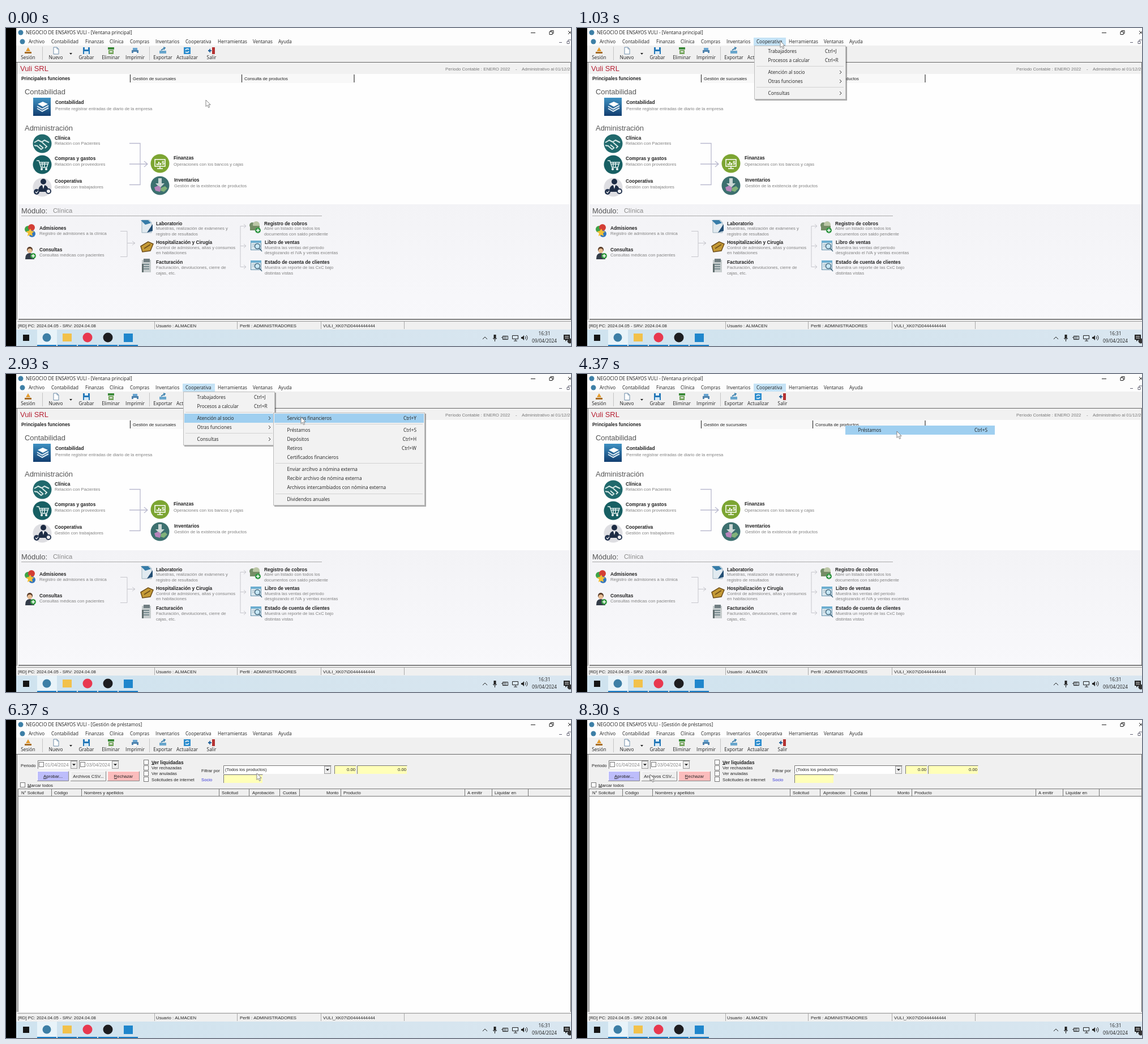
Animation, 998 px wide and 561 px high, one loop 8.33 s. Source, as an HTML page with a canvas:

```html
<!DOCTYPE html>
<html lang="es">
<head>
<meta charset="utf-8">
<title>Ventana principal</title>
<style>
html, body { margin: 0; width: 100%; height: 100%; overflow: hidden; background: #000 }
canvas { display: block; width: 998px; height: 561px }
</style>
</head>
<body>
<canvas id="stage" width="998" height="561"></canvas>
<script>
const g = document.getElementById('stage').getContext('2d');
const LOOP = 8330;
const UI = '"Open Sans", "Noto Sans", sans-serif';
const SANS = '"Liberation Sans", Arial, sans-serif';

// y is the visual middle of the line
function text(s, x, y, { size = 7.7, color = '#222', bold = false, align = 'left', font = SANS } = {}) {
  g.font = `${bold ? 'bold ' : ''}${size}px ${font}`;
  g.fillStyle = color;
  g.textAlign = align;
  g.fillText(s, x, y + size * .36);
}
const ui = (s, x, y, o) => text(s, x, y, { size: 8.3, font: UI, ...o });
const label = (s, x, y, o) => text(s, x, y, { size: 8.35, bold: true, ...o });
const note = (s, x, y) => text(s, x, y, { color: '#808080' });
const big = (s, x, y, o) => text(s, x, y, { size: 12.95, color: '#555', ...o });

function box(color, x, y, w, h) { g.fillStyle = color; g.fillRect(x, y, w, h); }
function frame(color, x, y, w, h) { g.strokeStyle = color; g.lineWidth = 1; g.strokeRect(x + .5, y + .5, w - 1, h - 1); }
function disc(color, x, y, r) { g.fillStyle = color; g.beginPath(); g.arc(x, y, r, 0, 7); g.fill(); }
function fill(color, d) { g.fillStyle = color; g.fill(new Path2D(d)); }
function line(color, d, w = 1) { g.strokeStyle = color; g.lineWidth = w; g.stroke(new Path2D(d)); }
function fade(c1, c2, y, h) {
  const f = g.createLinearGradient(0, y, 0, y + h);
  f.addColorStop(0, c1); f.addColorStop(1, c2);
  return f;
}
function at(x, y, draw) { g.save(); g.translate(x, y); draw(); g.restore(); }

function windowFrame(title) {
  box('#fdfdfd', 18, 0, 980, 31);
  disc('#3d7fa6', 26, 8, 4.5);
  ui(`NEGOCIO DE ENSAYOS VULI - [${title}]`, 35, 8.5);
  line('#222', 'M927 8.5h8M960 6.5h5v5h-5zM962 6v-1.5h5v5h-1.5M993 5l6 6M993 11l6-6');
  line('#667', 'M977 25.5h5M991 23.5h4v4h-4zM993 23v-2h5');
  disc('#3d7fa6', 29, 24, 4.5);
}

const MENUS = [['Archivo', 40], ['Contabilidad', 80], ['Finanzas', 140], ['Clínica', 183], ['Compras', 219],
  ['Inventarios', 264], ['Cooperativa', 317], ['Herramientas', 374], ['Ventanas', 436], ['Ayuda', 481]];

function menuBar(open) {
  if (open) box('#c5e3f6', 312, 17, 57, 14);
  for (const [s, x] of MENUS) ui(s, x, 24, { size: 8.1 });
}

function toolbar() {
  box('#f0f0f0', 18, 31, 980, 30);
  line('#c4c4c4', 'M64.5 33v24M253.5 33v24');
  const tools = [['Sesión', 39], ['Nuevo', 88], ['Grabar', 142], ['Eliminar', 185], ['Imprimir', 228],
    ['Exportar', 277], ['Actualizar', 320], ['Salir', 363]];
  for (const [s, x] of tools) ui(s, x, 52, { align: 'center' });
  fill('#e59b2c', 'M39 34l4 7h-8z'); box('#a66b24', 33, 42, 12, 3);
  fill('#fff', 'M84 34h6l3 3v9h-9z'); line('#6c8ca8', 'M84 34h6l3 3v9h-9zM90 34v3h3');
  fill('#222', 'M112 44h5l-2.5 3z');
  box('#2478b8', 136, 34, 12, 12); box('#e6f2fa', 139, 34, 6, 4); box('#d4e8f5', 138, 41, 8, 5);
  box('#3c8a3a', 180, 34, 11, 4); box('#75a55c', 181, 39, 9, 7); line('#eee', 'M183 42h5', 2);
  box('#6aa5d0', 224, 35, 8, 4); box('#5083ad', 222, 39, 12, 5); box('#fff', 225, 42, 6, 4);
  box('#69a6cc', 271, 40, 12, 5); line('#2f78a8', 'M274 39l5-3M278 34l3 1-2 3', 1.5);
  box('#2c8dce', 314, 34, 12, 12); line('#fff', 'M317 39a3.5 3 0 0 1 6-1M323 41a3.5 3 0 0 1-6 1', 1.5);
  box('#b43232', 364, 34, 5, 12); line('#27649b', 'M357 40h6', 2); fill('#27649b', 'M357 40l4-4v8z');
}

function statusBar() {
  box('#f0f0f0', 18, 516, 980, 16);
  line('#999', 'M20 517.5H998');
  line('#aaa', 'M262.5 518v13M408.5 518v13M556.5 518v13M703.5 518v13');
  const o = { size: 7.8 };
  text('[RD] PC: 2024.04.05 - SRV: 2024.04.08', 21, 525, o);
  text('Usuario : ALMACEN', 265, 525, o);
  text('Perfil : ADMINISTRADORES', 413, 525, o);
  text('VULI_XK07\\D0444444444', 560, 525, o);
}

function taskbar() {
  const f = g.createLinearGradient(18, 0, 998, 0);
  f.addColorStop(0, '#cfe3ef'); f.addColorStop(.5, '#d4e4ee'); f.addColorStop(1, '#d9e6f0');
  box(f, 18, 532, 980, 29);
  box('#e8f3f9', 55, 532, 35, 29);
  for (let i = 0; i < 5; i++) box('#1479c4', 55 + i * 36, 559, 34, 2);
  box('#151515', 30, 541, 11, 11);
  disc('#3d7fa6', 72, 546, 7.5);
  box('#f2c14b', 100, 539, 16, 14);
  disc('#e8384f', 144, 546, 8.5);
  disc('#1d1d20', 180, 546, 8.5);
  box('#1f86cc', 208, 539, 16, 15);
  const ink = '#222';
  line(ink, 'M842 549l4-4 4 4');
  box(ink, 861.5, 541, 4, 7); line(ink, 'M860 547q3.5 5 7 0M863.5 550v3');
  line(ink, 'M877.5 543.5h9v6h-9zM875 546h2M880 544v5M883 544v5');
  line(ink, 'M894.5 542.5h10v6h-10zM897 552h6M900 549v3');
  fill(ink, 'M910 545h2l3-3v9l-3-3h-2z'); line(ink, 'M917 544q2 2.5 0 5M919 542q4 4.5 0 9');
  ui('16:31', 951, 539.5, { align: 'center' });
  ui('09/04/2024', 951, 552.5, { align: 'center' });
  fill(ink, 'M985 541h11v9h-5l-3 3v-3h-3z'); line('#fff', 'M987 544h7M987 547h7');
  disc('#333', 996, 552, 4.5);
}

function roundIcon(color, x, y, draw) {
  at(x, y, () => { disc(color, 0, 0, 16.5); draw(); });
}

function paperIcon(x, y) {
  at(x, y, () => {
    box('#d6e5ed', -9, -9, 19, 17); frame('#6a95af', -9, -9, 19, 17);
    box('#6daed0', -9, -9, 19, 4);
    line('#a3b6c0', 'M-6-2h7M-6 1h5');
    disc('#c7e7f5', 3, 1, 4.5); line('#466b80', 'M7.5 1a4.5 4.5 0 1 1-9 0a4.5 4.5 0 1 1 9 0M6 4l5 6', 1.5);
  });
}

function mainIcons() {
  box(fade('#3e91c2', '#123e70', 123, 32), 48, 123, 31, 32);
  fill('#fff', 'M56 134l9-4 9 4-9 5z'); line('#dceaf4', 'M55 138l9 5 11-6M55 142l9 5 11-6', 2);
  roundIcon('#20696c', 64, 204, () => {
    line('#d8e9e7', 'M-14-2l7-4 6 3 5-3 8 4M-10 3l8 7 3-2M-5 2l7 6M0-2l8 7-3 3M-14 3l4 1', 2);
  });
  roundIcon('#175f63', 64, 241, () => {
    line('#e3f1ef', 'M-10-7h4l4 12h10l3-9H-5M-3-1h13M0-4v8M4-4v8', 1.5);
    disc('#fff', -1, 8, 2); disc('#fff', 7, 8, 2);
  });
  roundIcon('#dedee2', 64, 281, () => {
    disc('#1d2c44', 2, -10, 5); fill('#1d2c44', 'M-7 8q0-12 9-12t9 12z');
    fill('#fff', 'M0-4h4l-2 7z');
    disc('#24344f', -10, 8, 5); line('#fff', 'M-12 8l2 2 3-4', 1.2);
    disc('#24344f', 11, 7, 5); disc('#f4f4f4', 11, 7, 3);
  });
  roundIcon('#7ca532', 272, 239, () => {
    line('#fff', 'M-9-7h18v12H-9zM0 5v4M-5 9h10', 1.5);
    line('#fff', 'M-5 3v-3M-2 3v-6M1 3v-4', 2);
    text('$', 3, -1, { color: '#fff', bold: true, size: 9 });
  });
  roundIcon('#3d706f', 272, 278, () => {
    fill('#cbd7d5', 'M-3-13h6v9h5l-8 8-8-8h5z');
    fill('#b784bb', 'M-10 3l7-3 5 4-2 7-8-2z'); fill('#82b27a', 'M2 4l7-3 4 4-6 6-6-2z');
  });

  disc('#3da447', 39, 355, 6); disc('#d33e35', 45, 352, 6); disc('#3476bd', 46, 363, 6);
  fill('#f2bf35', 'M43 354l2 4 5 1-4 3 1 5-4-2-5 2 1-5-4-3 5-1z');
  disc('#593c28', 42, 391, 5); disc('#e8bd94', 42, 393, 4);
  fill('#333c48', 'M34 408q0-11 8-11t8 11z'); disc('#389c45', 48, 402, 5); line('#fff', 'M45 402h6M48 399v6', 1.5);
  fill('#e1eaf0', 'M240 339h13l4 4v18h-17z'); line('#9eb2bd', 'M240 339h13l4 4v18h-17z');
  fill('#367ca8', 'M238 339h13l5 5-10 3z'); fill('#244f75', 'M249 361l10-3v-12z');
  fill('#c49a36', 'M238 385l13-8 9 4-5 12-14 2z'); line('#6e4d1b', 'M238 385l13-8 9 4-5 12-14 2zM244 389l11-7', 1.5);
  box('#c6cccd', 240, 409, 16, 22); box('#707d81', 243, 407, 11, 6); line('#788b90', 'M243 417h10M243 421h10M243 425h10', 2);
  box('#626f70', 240, 416, 3, 15);
  disc('#748e69', 435, 348, 5); disc('#bbc6a6', 442, 347, 6); box('#758d66', 431, 349, 17, 8);
  disc('#329744', 445, 357, 5); line('#fff', 'M442 357h6M445 354v6', 1.5);
  paperIcon(441, 384); paperIcon(441, 419);
}

const ITEMS = [
  ['Contabilidad', 87, 130.5, 'Permite registrar entradas de diario de la empresa', 142.5],
  ['Clínica', 86, 193.5, 'Relación con Pacientes', 203.5],
  ['Compras y gastos', 86, 230, 'Relación con proveedores', 240],
  ['Cooperativa', 86, 269.5, 'Gestión con trabajadores', 280],
  ['Finanzas', 296, 228.5, 'Operaciones con los bancos y cajas', 240],
  ['Inventarios', 297, 268, 'Gestión de la existencia de productos', 278.5],
  ['Admisiones', 59, 353, 'Registro de admisiones a la clínica', 362.5],
  ['Consultas', 59, 391, 'Consultas médicas con pacientes', 400.5],
  ['Laboratorio', 265, 344.5, 'Muestras, realización de exámenes y|registro de resultados', 353.5],
  ['Hospitalización y Cirugía', 265, 378, 'Control de admisiones, altas y consumos|en habitaciones', 387],
  ['Facturación', 265, 413, 'Facturación, devoluciones, cierre de|cajas, etc.', 422.5],
  ['Registro de cobros', 456, 344.5, 'Abre un listado con todos los|documentos con saldo pendiente', 353.5],
  ['Libro de ventas', 457, 378, 'Muestra las ventas del periodo|desglozando el IVA y ventas excentas', 387],
  ['Estado de cuenta de clientes', 457, 413, 'Muestra un reporte de las CxC bajo|distintas vistas', 422.5]
];

// panel below the toolbar with its dark edges
function panel(color) {
  box(color, 18, 61, 980, 455);
  line('#666', 'M18 60.5H998M19.5 61V515M997.5 61V515');
}

function mainView() {
  panel('#fefefe');
  box('#f1f1f1', 20, 61, 977, 20);
  box(fade('#f3f3f6', '#f8f8fb', 311, 203), 22, 311, 975, 203);
  line('#555', 'M22 514H998', 1.3);
  big('Vuli SRL', 25, 71, { color: '#b51f32' });
  const o = { size: 7.8, color: '#777' };
  text('Período Contable : ENERO 2022', 776, 72, o);
  text('-', 900, 72, o);
  text('Administrativo al 01/12/2022', 911, 72, o);
  box('#f8f8f8', 220, 81, 396, 16);
  label('Principales funciones', 27, 89);
  text('Gestión de sucursales', 224, 89.5);
  text('Consulta de productos', 421, 89.5);
  line('#444', 'M219.5 82v14M416.5 82v14M615 82v14', 1.3);
  big('Contabilidad', 33, 112.5);
  big('Administración', 33, 176.5);
  big('Módulo:', 27, 322);
  text('Clínica', 83, 322, { size: 11.2, color: '#888' });
  line('#aaa', 'M27 331.5H558');
  line('#b9b9ce', 'M218 203.5h19v73h-19M218 240h31M244 235l6 5-6 5', 1.3);
  line('#c6c6cc', 'M202 358.5h12v45h-12M214 379.5h13M223 376l5 3.5-5 3.5M424 349.5h-10v72h10M414 384.5h10M420 346l4 3.5-4 3.5M420 381l4 3.5-4 3.5M420 418l4 3.5-4 3.5');
  mainIcons();
  for (const [name, x, y, desc, dy] of ITEMS) {
    label(name, x, y);
    desc.split('|').forEach((s, i) => note(s, x, dy + i * 9.5));
  }
}

function field(color, x, y, w, h) {
  box(color, x, y, w, h);
  line('#777', `M${x + .5} ${y + h}v${-h + .5}h${w}`);
}
function combo(x, y, w, h) {
  field('#fff', x, y, w, h);
  box('#ececec', x + w - 12, y + 1, 12, h - 1);
  frame('#999', x + w - 12, y + 1, 12, h - 1);
  fill('#111', `M${x + w - 9} ${y + h / 2 - 1}h6l-3 3z`);
}
function check(x, y) { box('#fff', x, y, 9, 9); frame('#777', x, y, 9, 9); }
function button(s, x, w, color) {
  box(color, x, 90, w, 18);
  line('#fff', `M${x + .5} 108v-17.5h${w}`);
  line('#888', `M${x} 107.5h${w - .5}v-17`);
  text(s, x + w / 2, 99.5, { size: 7.9, align: 'center' });
}

function loansView() {
  panel('#f0f0f0');
  text('Periodo', 26, 80);
  combo(56, 71, 70, 15); combo(129, 71, 70, 15);
  check(58, 74); check(131, 74);
  text('01/04/2024', 69, 79, { size: 8.3, color: '#888' });
  text('03/04/2024', 142, 79, { size: 8.3, color: '#888' });
  button('Aprobar...', 55, 56, '#bdbdfb');
  button('Archivos CSV...', 114, 63, '#eeeeee');
  button('Rechazar', 179, 57, '#fbbcbc');
  line('#222', 'M66 103.5h5M191 103.5h5M38 118.5h6M257 78.5h5');
  check(25, 110); text('Marcar todos', 38, 115);
  ['Ver liquidadas', 'Ver rechazadas', 'Ver anuladas', 'Solicitudes de internet'].forEach((s, i) => {
    const y = 74.5 + i * 10.1;
    check(243, Math.round(y - 5));
    i ? text(s, 257, y) : label(s, 257, y);
  });
  text('Filtrar por', 345, 89);
  text('Socio', 345, 105, { color: '#3434d8' });
  combo(384, 80, 190, 15);
  text('(Todos los productos)', 387, 87.5);
  field('#ffffb8', 384, 96, 69, 15);
  field('#ffffb8', 580, 80, 38, 15);
  field('#ffffb8', 620, 80, 88, 15);
  text('0.00', 617, 87, { align: 'right' });
  text('0.00', 707, 87, { align: 'right' });

  box('#fefefe', 22, 135, 975, 380);
  box('#efefef', 22, 122, 975, 13);
  line('#777', 'M22 121.5H998M22 134.5H998M21.5 121V515');
  for (const x of [80, 133, 376, 429, 483, 518, 591, 810, 858, 922]) line('#777', `M${x + .5} 122v12`);
  const cols = [['N° Solicitud', 27], ['Código', 85], ['Nombres y apellidos', 138], ['Solicitud', 381], ['Aprobación', 435],
    ['Cuotas', 489], ['Monto', 566], ['Producto', 596], ['A emitir', 815], ['Liquidar en', 863]];
  for (const [s, x] of cols) text(s, x, 128.5);
}

const ROOT = { x: 313, y: 31, w: 162, h: 95, seps: [67, 104], rows: [
  ['Trabajadores', 41, 'Ctrl+J'], ['Procesos a calcular', 57, 'Ctrl+R'], ['Atención al socio', 78, '>'],
  ['Otras funciones', 94, '>'], ['Consultas', 115, '>']] };
const SUB = { x: 472, y: 68, w: 268, h: 164, seps: [88, 157, 211], rows: [
  ['Servicios financieros', 78, 'Ctrl+Y'], ['Préstamos', 99, 'Ctrl+S'], ['Depósitos', 115, 'Ctrl+H'], ['Retiros', 131, 'Ctrl+W'],
  ['Certificados financieros', 147], ['Enviar arcihvo a nómina externa', 168], ['Recibir archivo de nómina externa', 184],
  ['Archivos intercambiados con nómina externa', 200], ['Dividendos anuales', 221]] };

function row(m, [s, y, key], hot) {
  if (hot) box('#9fcff0', m.x + 2, y - 8, m.w - 4, 16);
  ui(s, m.x + 24.5, y);
  if (key === '>') line('#333', `M${m.x + 151} ${y - 3}l3 3-3 3`);
  else if (key) ui(key, m === ROOT ? m.x + 125 : m.x + m.w - 15, y, { align: m === ROOT ? 'left' : 'right' });
}
function popup(m, hotY) {
  box('#0005', m.x + 2, m.y + 2, m.w, m.h);
  box('#f2f2f2', m.x, m.y, m.w, m.h);
  frame('#bdbdbd', m.x, m.y, m.w, m.h);
  for (const y of m.seps) box('#d2d2d2', m.x + 4, y, m.w - 8, 1);
  for (const r of m.rows) row(m, r, Math.abs(r[1] - hotY) < 8);
}

// time, x, y of the pointer
const PATH = [[0, 353, 127], [150, 353, 127], [800, 359, 23], [1150, 359, 23], [1650, 372, 77], [2100, 420, 77], [2700, 521, 76],
  [3400, 521, 76], [4100, 565, 101], [4650, 565, 101], [5300, 544, 107], [6000, 544, 107], [6370, 443, 94], [6800, 430, 94],
  [7900, 129, 96], [LOOP, 129, 96]];

function pointer(t) {
  const i = PATH.findIndex(p => p[0] > t);
  const [t0, x0, y0] = PATH[i - 1], [t1, x1, y1] = PATH[i];
  const k = (t - t0) / (t1 - t0), e = k * k * (3 - 2 * k);
  return [x0 + (x1 - x0) * e, y0 + (y1 - y0) * e];
}

function drawPointer(x, y, busy, t) {
  at(x, y, () => {
    if (busy) {
      g.lineWidth = 3;
      g.strokeStyle = '#2586d8';
      g.beginPath(); g.arc(0, 0, 5.5, 0, 7); g.stroke();
      g.strokeStyle = '#65b5ee';
      g.beginPath(); g.arc(0, 0, 5.5, t / 160, t / 160 + 1.5); g.stroke();
      return;
    }
    const d = 'M0 0v11.5l2.7-2.5 2 4.5 2-1-2-4.2h3.5z';
    fill('#fff', d); line('#777', d, .9);
  });
}

function draw(now) {
  const t = now % LOOP, [x, y] = pointer(t);
  const loans = t >= 6080, open = t >= 930 && t < 4330, sub = t >= 2000 && t < 4330;
  box('#000', 0, 0, 998, 561);
  windowFrame(loans ? 'Gestión de préstamos' : 'Ventana principal');
  menuBar(t >= 930 && t < 4560);
  toolbar();
  loans ? loansView() : mainView();
  statusBar();
  taskbar();
  if (open) popup(ROOT, sub ? 78 : y);
  if (sub) popup(SUB, x > 472 ? y : -99);
  if (t >= 4330 && t < 4600) {
    g.globalAlpha = Math.min(1, (4600 - t) / 150);
    row(SUB, SUB.rows[1], true);
    g.globalAlpha = 1;
  }
  drawPointer(x, y, t >= 4700 && t < 6080, t);
}

const start = performance.now();
function tick() {
  draw(performance.now() - start);
  requestAnimationFrame(tick);
}
tick();
</script>
</body>
</html>
```
